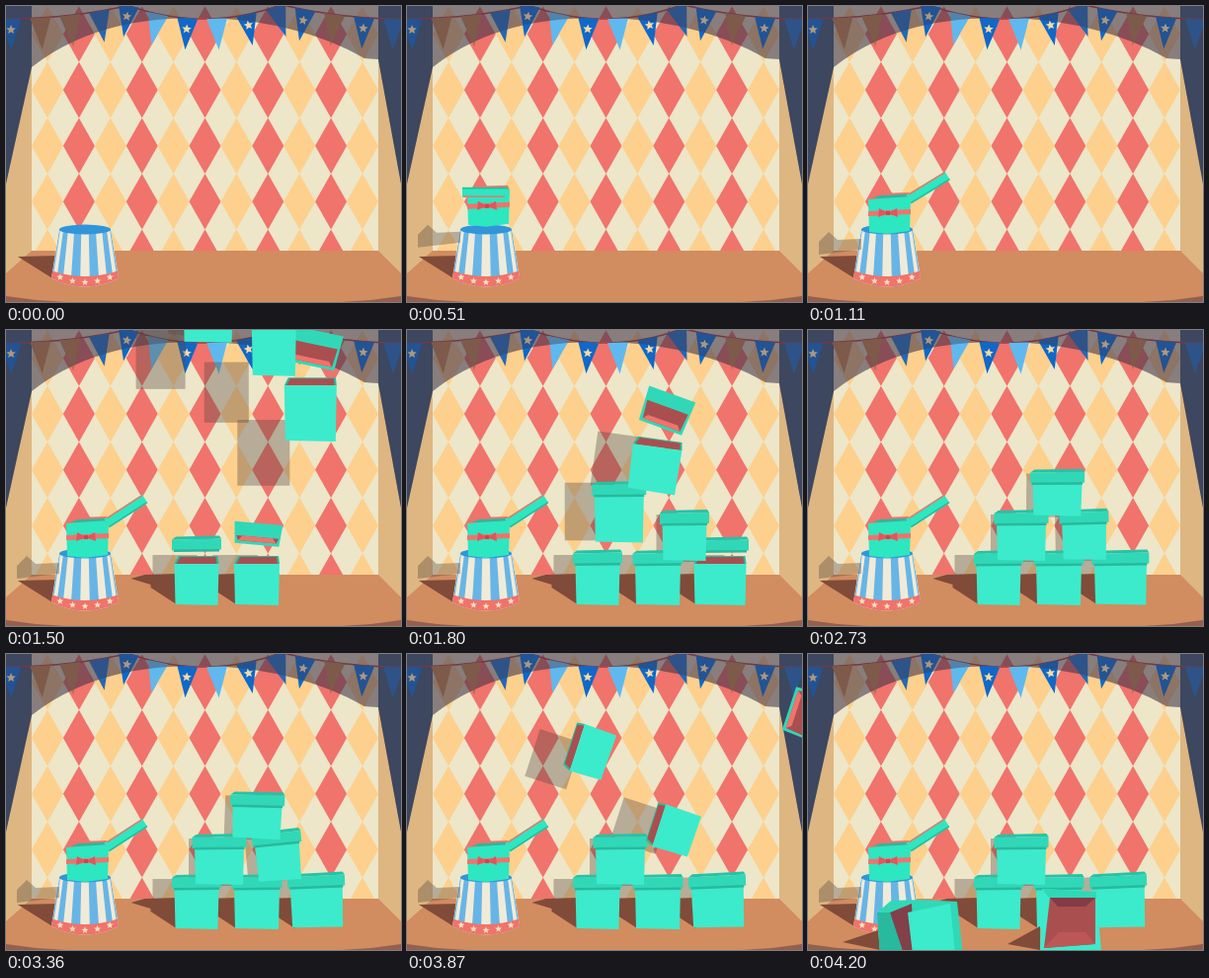
An HTML page with a canvas for the animation above (5.4 s loop, 400 by 300 pixels).

```html
<!DOCTYPE html>
<html lang="en">
<head>
<meta charset="utf-8">
<title>Circus boxes</title>
<style>
  html, body { margin: 0; width: 100%; height: 100%; overflow: hidden; background: #3d4760; }
  canvas { display: block; width: 400px; height: 300px; }
</style>
</head>
<body>
<canvas id="stage" width="400" height="300"></canvas>
<script>
const ctx = document.getElementById('stage').getContext('2d');
const LOOP = 5400, STEP = 30, END = 4200;
const LAUNCH = 1120, SWAY = 2460, BURST = 3600;
const TEAL = '#3cebcb', LID = '#30d8b8', EDGE = '#28b99e', INSIDE = '#a94f50';
const RED = '#f0736c', CREAM = '#ede6c8', SHADE = 'rgba(84,70,66,.36)', FLOOR_SHADE = '#804b39';

const clamp = v => Math.max(0, Math.min(1, v));
const mix = (a, b, u) => a + (b - a) * u;
const progress = (t, from, to) => clamp((t - from) / (to - from));
const smooth = u => u * u * (3 - 2 * u);
const easeOut = u => 1 - (1 - u) ** 2;
const easeOutBack = u => 1 + 2.7 * (u - 1) ** 3 + 1.7 * (u - 1) ** 2;
const arc = u => 4 * u * (1 - u);
const bounce = (ms, height) => ms < 0 ? 0 : height * Math.exp(-ms / 120) * Math.abs(Math.sin(ms / 60));

function poly(color, ...p) {
  ctx.fillStyle = color;
  ctx.beginPath();
  for (let i = 0; i < p.length; i += 2) ctx.lineTo(p[i], p[i + 1]);
  ctx.closePath();
  ctx.fill();
}

function rect(color, x, y, w, h) {
  ctx.fillStyle = color;
  ctx.fillRect(x, y, w, h);
}

function star(color, x, y, r) {
  const pts = [];
  for (let i = 0; i < 10; i++) {
    const a = i * Math.PI / 5 - Math.PI / 2, d = i % 2 ? r * .45 : r;
    pts.push(x + d * Math.cos(a), y + d * Math.sin(a));
  }
  poly(color, ...pts);
}

function placed(x, y, angle, draw) {
  ctx.save();
  ctx.translate(x, y);
  ctx.rotate(angle * Math.PI / 180);
  draw();
  ctx.restore();
}

function onWall(draw) {
  ctx.save();
  ctx.beginPath();
  ctx.rect(26, 0, 351, 248);
  ctx.clip();
  draw();
  ctx.restore();
}

// Everything outside the spotlight
function darkness(alpha) {
  ctx.fillStyle = `rgba(60,52,72,${alpha})`;
  ctx.beginPath();
  ctx.moveTo(0, 0);
  ctx.lineTo(0, 180);
  ctx.lineTo(26, 62);
  ctx.bezierCurveTo(80, 20, 140, 12, 195, 12);
  ctx.bezierCurveTo(260, 12, 320, 28, 363, 53);
  ctx.lineTo(377, 54);
  ctx.lineTo(400, 180);
  ctx.lineTo(400, 0);
  ctx.fill();
}

// Three hanging strings meet near the top edge
const sag = (x, middle, reach) => 13 * (1 - ((x - middle) / reach) ** 2);
const ropeY = x => Math.max(sag(x, 0, 122), sag(x, 200, 75), sag(x, 400, 115));

function bunting() {
  const colors = { s: '#1068c8', b: '#2468b4', y: '#5fb9ee', t: '#a8744c' };
  ctx.strokeStyle = '#983c44';
  ctx.lineWidth = 1.5;
  ctx.beginPath();
  for (let x = 0; x <= 400; x += 4) ctx.lineTo(x, ropeY(x));
  ctx.stroke();
  [...'sttbsysysbstsb'].forEach((kind, i) => {
    const x = 5 + i * 29.8, slope = (ropeY(x + 1) - ropeY(x - 1)) / 2;
    placed(x, ropeY(x), Math.atan(slope) * 180 / Math.PI, () => {
      poly(colors[kind], -10.5, 0, 10.5, 0, 0, 32);
      if (kind === 's') star('#f7dba4', 0, 11, 5);
    });
  });
}

function scenery() {
  rect(CREAM, 26, 0, 351, 248);
  onWall(() => {
    for (let c = 0; c < 11; c++) for (let r = 0; r < 5; r++) {
      const x = 42 + c * 31.9, y = 28.5 + r * 56.6;
      poly(c % 2 ? RED : '#fdd08d', x, y - 28.3, x + 16, y, x, y + 28.3, x - 16, y);
    }
    darkness(.3);
  });
  rect('#deb681', 0, 0, 26, 275);
  rect('#deb681', 377, 0, 23, 275);
  poly('#d18c60', 26, 248, 377, 248, 400, 271, 400, 300, 0, 300, 0, 271);
  poly('#93604f', 0, 294, 30, 298, 60, 300, 0, 300);
  poly('#93604f', 400, 294, 370, 298, 340, 300, 400, 300);
  poly('#3e5470', 0, 0, 26, 0, 26, 62, 0, 180);
  poly('#3e5470', 400, 0, 377, 0, 377, 54, 400, 180);
  bunting();
  darkness(.4);
}

function pedestal() {
  const STRIPES = 11;
  const edge = (i, radius) => 80 - radius * Math.cos(i * Math.PI / STRIPES);
  poly(FLOOR_SHADE, 47, 276, 12, 254, 54, 253);
  ctx.save();
  ctx.beginPath();
  ctx.moveTo(54, 226);
  ctx.lineTo(106, 226);
  ctx.lineTo(114, 276);
  ctx.quadraticCurveTo(80, 293, 46, 276);
  ctx.clip();
  rect('#f0ebd8', 40, 220, 80, 70);
  for (let i = 0; i < STRIPES; i += 2)
    poly('#67b5e6', edge(i, 26), 226, edge(i + 1, 26), 226, edge(i + 1, 36), 290, edge(i, 36), 290);
  ctx.fillStyle = RED;
  ctx.beginPath();
  ctx.moveTo(40, 266);
  ctx.quadraticCurveTo(80, 282, 120, 266);
  ctx.lineTo(120, 295);
  ctx.lineTo(40, 295);
  ctx.fill();
  ctx.restore();
  for (let i = -2; i <= 2; i++) star('#f4e3c0', 80 + i * 12.6, 280 - i * i * 1.3, 3.6);
  ctx.fillStyle = '#3096d9';
  ctx.beginPath();
  ctx.ellipse(80, 226.5, 26, 5, 0, 0, 7);
  ctx.fill();
}

function gift(t) {
  if (t < 180) return;
  const fall = progress(t, 180, 450);
  const dy = -222 * (1 - fall * fall) - bounce(t - 450, 14);
  const swing = -180 + 147 * easeOutBack(progress(t, 780, 1140));
  ctx.save();
  ctx.translate(0, dy);
  poly(SHADE, 11, 239, 21, 229, 30, 237, 54, 236, 54, 247, 11, 252);
  poly(RED, 61, 196, 71, 190, 102, 189, 104, 194);
  poly(EDGE, 65, 195, 73, 192, 100, 191, 102, 194);
  poly('#2ce7c0', 61, 196, 104, 193, 103, 228, 80, 231, 62, 229);
  poly(RED, 61, 208, 104, 206, 104, 211, 61, 213);
  for (const s of [-1, 1]) poly('#e4545c', 81, 210, 81 + s * 9, 205, 81 + s * 10, 214);
  rect('#cf444f', 79, 208, 4, 4);
  placed(102, 196, swing, () => {
    rect('#2ce7c0', 0, -5, 46, 10);
    rect(RED, 3, -5, 42, 1.5);
    rect(EDGE, 0, 3.5, 46, 1.5);
  });
  ctx.restore();
}

// land: touch-down time, lag: how much later the lid closes,
// sway: lean in degrees, tumble: where the box ends after the burst
const boxes = [
  { row: 0, x: 193, w: 45, land: 1450, lag: 140 },
  { row: 0, x: 254, w: 46, land: 1450, lag: 170 },
  { row: 0, x: 317, w: 53, land: 1755, lag: 130, sway: -2 },
  { row: 1, x: 216, w: 50, land: 1835, lag: 0 },
  { row: 1, x: 281, w: 45, land: 1785, lag: 0, sway: -5,
    tumble: { x: 264, y: 268, rise: 60, shape: openBox } },
  { row: 2, x: 252, w: 50, land: 1845, lag: 140, sway: 2,
    tumble: { x: 111, y: 276, rise: 120, shape: tippedBox } }
];
boxes.forEach((box, i) => {
  box.y = 258 - 43 * box.row;
  box.h = 42 - 4 * box.row;
  box.launch = LAUNCH + 25 * i;
});

const isOut = (box, t) => t >= box.launch;
const isFallen = (box, t) => box.tumble && t >= BURST + 330;

function pose(box, t) {
  const { tumble, sway = 0 } = box;
  const u = progress(t, BURST, END);
  if (tumble && u > 0) return {
    x: mix(box.x, tumble.x, u), y: mix(box.y, tumble.y, u) - tumble.rise * arc(u),
    angle: isFallen(box, t) ? -50 * (1 - u) : -160 * u, stretch: 1
  };
  const thrown = easeOut(progress(t, box.launch, box.launch + 150));
  const above = .68 * Math.max(0, box.land - t);
  const lean = sway * smooth(progress(t, SWAY, 3360));
  return {
    x: mix(84, box.x - above * .05 + lean, thrown),
    y: mix(212, box.y - above - Math.abs(lean) * .8, thrown),
    angle: mix(25, lean + 8 * clamp(above / 30) * (box.row > 1), thrown),
    stretch: 1 + .35 * clamp(above / 30)
  };
}

function lidState(box, t) {
  const wait = box.land + box.lag - t;
  if (!box.lag) return { gap: 0, under: 0 };
  return { gap: Math.min(20, Math.max(0, wait) * .16) + bounce(-wait, 10), under: clamp((wait - 95) / 60) };
}

function openBox() {
  poly(FLOOR_SHADE, -29, 8, -62, 26, -29, 32);
  poly(TEAL, -27, -30, 28, -27, 33, 34, -29, 34);
  poly(LID, -27, -30, 28, -27, 28, -21, -20, -21);
  poly(INSIDE, -19, -21, 27, -21, 27, 26, -25, 30);
  poly('#843b46', -19, -21, 27, -21, 17, -12, -11, -12);
  poly('#bd5757', -25, 30, -10, 14, 17, 14, 27, 26);
}

function tippedBox() {
  poly(FLOOR_SHADE, -76, 16, -40, 4, -38, 24);
  poly(LID, -41, -14, -27, -26, 2, -27, 40, -25, 46, 30, -38, 30);
  poly('#82404a', -28, -14, -6, -23, -4, 26, -18, 26);
  poly(EDGE, -41, -14, -28, -14, -14, 28, -38, 28);
  poly(TEAL, -10, -14, 33, -23, 38, 28, -5, 28);
}

function drawLid(w, under) {
  const height = 12 + 24 * under, half = w / 2;
  if (under > .05) {
    poly(LID, -half, -height, half, -height, half - 2, 0, 2 - half, 0);
    poly(INSIDE, 3 - half, 14 - height, half - 3, 14 - height, half - 5, -3, 5 - half, -3);
    poly(RED, 9 - half, -8, half - 9, -8, half - 5, -3, 5 - half, -3);
  } else {
    poly('#27c2a6', -half, -10, 4 - half, -13, half - 2, -14, half, -11);
    poly(LID, -half, -10, half, -11, half, 0, -half, 1);
    poly(EDGE, 2 - half, 0, half - 2, -.5, half - 2, 2, 2 - half, 2.5);
  }
}

function drawBox(box, t) {
  const { x, y, angle, stretch } = pose(box, t);
  const burst = box.tumble ? progress(t, BURST, END) : 0;
  const { gap, under } = lidState(box, t);
  const half = box.w / 2, top = -box.h * stretch / 2;
  if (isFallen(box, t)) placed(x, y, angle, box.tumble.shape);
  else placed(x, y, angle, () => {
    if (gap > 1 || burst) {
      poly(EDGE, -half, top, 4 - half, top - 8, half - 1, top - 8, half, top);
      poly(INSIDE, 2 - half, top, 6 - half, top - 7, half - 3, top - 7, half - 2, top);
    }
    poly(TEAL, -half, top, half, top, half - 1, -top, 1 - half, -top - 1);
    if (!burst) placed(0, top - gap, 12 * under, () => drawLid(box.w + 5 * (1 - under), under));
  });
  if (burst) placed(box.x + 300 * burst, box.y - 18 - 100 * arc(burst), 240 * burst, () => drawLid(box.w, 1));
}

function boxShadows(t) {
  const standing = boxes.filter(box => isOut(box, t) && !isFallen(box, t));
  onWall(() => standing.forEach(box => {
    const { x, y, angle, stretch } = pose(box, t);
    const air = clamp((box.y - y) / 180), near = clamp((box.y - y) / 30);
    const off = mix(box.row ? 6 : 22, 34, near) + 14 * air;
    const half = box.h * stretch / 2;
    placed(x - off, y - 3 - 14 * near + 60 * air, angle, () => rect(SHADE, -box.w / 2, -half - 6, box.w, half * 2 + 10));
  }));
  standing.filter(box => !box.row && t >= box.land).forEach(({ x, y, w, h }) => {
    const left = x - w / 2 + 2, base = y + h / 2 - 1;
    poly(FLOOR_SHADE, left, base, left - 26, base - 17, left - 26, base - 20, left - 46, 252, left - 32, 248, left, 247);
  });
}

function draw(t) {
  scenery();
  boxShadows(t);
  pedestal();
  const live = boxes.filter(box => isOut(box, t));
  live.filter(box => !isFallen(box, t)).forEach(box => drawBox(box, t));
  gift(t);
  live.filter(box => isFallen(box, t)).forEach(box => drawBox(box, t));
}

const start = performance.now();
function tick() {
  const t = (performance.now() - start) % LOOP;
  draw(Math.min(END, Math.floor(t / STEP) * STEP));
  requestAnimationFrame(tick);
}
tick();
</script>
</body>
</html>
```
